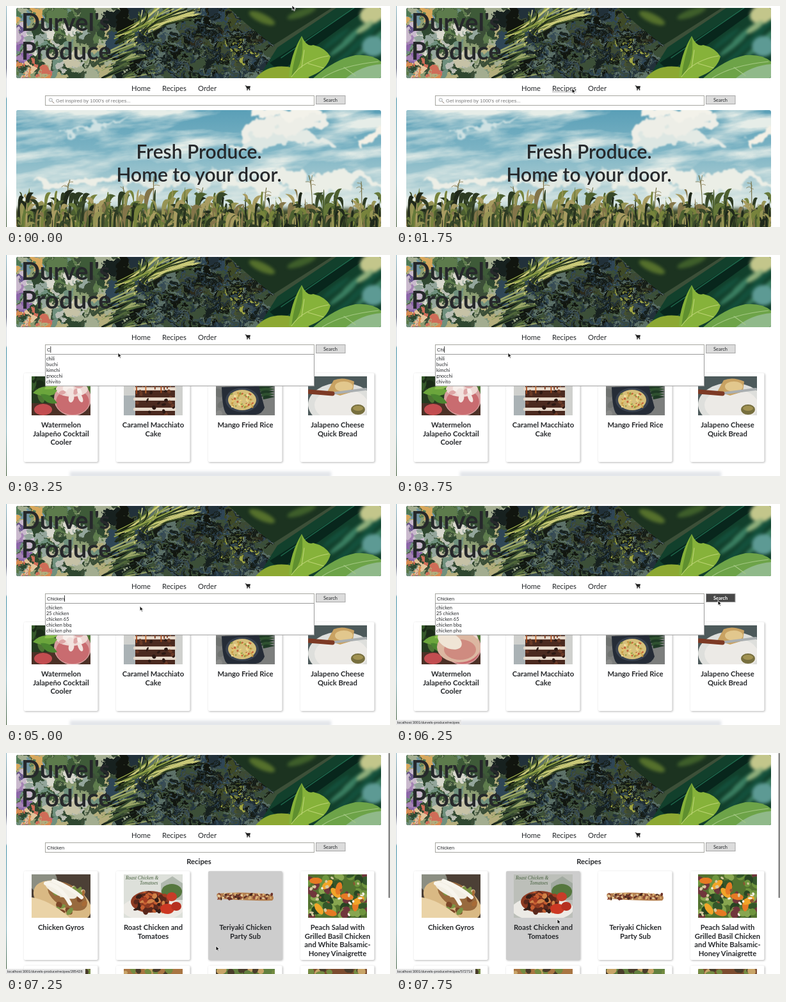
Recreate the animation shown at these times as an HTML page. Size 600x346 px, loop 8000 ms.

```html
<!DOCTYPE html>
<html lang="en">
<head>
<meta charset="utf-8">
<title>Durvel's Produce</title>
<style>
  html, body { margin: 0; width: 100%; height: 100%; overflow: hidden; background: #fff; }
  svg { display: block; }
  text { font-family: Lato, sans-serif; fill: #26282b; white-space: pre; }
  filter { color-interpolation-filters: sRGB; }
  .bold { font-weight: 700; }
  .mid { text-anchor: middle; }
  .ui { font-family: "Liberation Sans", Arial, sans-serif; }
  .card { filter: drop-shadow(1px 1px 1.5px #b5b5b5); }
</style>
</head>
<body>
<svg id="stage" width="600" height="346" viewBox="0 0 600 346"></svg>
<script>
const LOOP = 8000, STEP = 250;
let seed = 11;
const rnd = (a = 0, b = 1) => a + (b - a) * ((seed = seed * 16807 % 2147483647) / 2147483647);
const pick = list => list[Math.floor(rnd(0, list.length))];
const many = (n, make) => Array.from({ length: n }, (_, i) => make(i)).join('');

// Drawing helpers, each returning SVG markup
const rect = (x, y, w, h, fill, more = '') =>
  `<rect x="${x}" y="${y}" width="${w}" height="${h}" fill="${fill}" ${more}/>`;
const oval = (x, y, rx, ry, fill, turn = 0) =>
  `<ellipse rx="${rx}" ry="${ry}" fill="${fill}" transform="translate(${x} ${y}) rotate(${turn})"/>`;
const shape = (d, fill, more = '') => `<path d="${d}" fill="${fill}" ${more}/>`;
const stroke = (d, color, width = 1) =>
  `<path d="${d}" fill="none" stroke="${color}" stroke-width="${width}" stroke-linecap="round"/>`;
const text = (x, y, size, str, cls = '', more = '') =>
  `<text x="${x}" y="${y}" font-size="${size}" class="${cls}" ${more}>${str}</text>`;
const group = (id, body) => `<g id="${id}">${body}</g>`;
const blurred = (amount, body) => `<g style="filter:blur(${amount}px)">${body}</g>`;
const filtered = (id, body) => `<g filter="url(#${id})">${body}</g>`;
const frame = (x, y, w, h, body) => `<svg x="${x}" y="${y}" width="${w}" height="${h}">${body}</svg>`;
const rounded = (id, x, y, w, h, body) => `<clipPath id="${id}">${rect(x, y, w, h, '#000', 'rx="3"')}</clipPath>` +
  `<g clip-path="url(#${id})">${frame(x, y, w, h, body)}</g>`;
const gradient = (id, ...stops) => `<linearGradient id="${id}" x2="0" y2="1">` +
  stops.map(([at, color]) => `<stop offset="${at}" stop-color="${color}"/>`).join('') + '</linearGradient>';
const ragged = (id, frequency, scale, blur) => `<filter id="${id}" x="-10%" y="-10%" width="120%" height="120%">
  <feTurbulence type="fractalNoise" baseFrequency="${frequency}" numOctaves="4" seed="4" result="noise"/>
  <feDisplacementMap in="SourceGraphic" in2="noise" scale="${scale}" xChannelSelector="R" yChannelSelector="G"/>
  <feGaussianBlur stdDeviation="${blur}"/></filter>`;
const scatter = (n, x0, y0, x1, y1, size, colors) => many(n, () =>
  oval(rnd(x0, x1), rnd(y0, y1), rnd(size * .5, size), rnd(size * .3, size * .8), pick(colors), rnd(0, 180)));

function banner() {
  const kale = ['#17211f', '#22313a', '#3a4d54', '#5d7168', '#11150f', '#2f4656', '#3d4a34', '#151b14'];
  const curl = (x, y) => stroke(`M${x} ${y}q${rnd(-7, 7)} ${rnd(-7, 2)} ${rnd(3, 8)} ${rnd(-5, 4)}` +
    `t${rnd(-6, 8)} ${rnd(-4, 6)}`, pick(kale), rnd(1, 3));
  const scraps = filtered('crumple',
    scatter(120, -10, -10, 165, 120, 17, ['#5d7b4c', '#8b9c72', '#3e5a38', '#a3ad90', '#6f8f7d', '#2f4730', '#b3ad7c']) +
    scatter(30, 15, 30, 105, 95, 11, ['#d8d8cd', '#b9bdb4', '#c6c2a6', '#93a59b']) +
    scatter(16, -5, 30, 18, 85, 10, ['#8c66a8', '#a583b4', '#6c5a8e', '#c9b9cd']) +
    scatter(14, -5, 88, 55, 112, 8, ['#d98a4f', '#cf6d58', '#e3c39a', '#b56a83']) +
    scatter(14, -5, 0, 40, 20, 10, ['#6e94a3', '#4f7a55', '#d6a75c']));
  const darkLeaves = filtered('crumple',
    scatter(90, 150, -5, 400, 115, 18, kale) + scatter(30, 270, 0, 400, 60, 14, ['#10150f', '#2c2a1c', '#3f4a26']));
  const stems = many(54, () => stroke(
    `M${rnd(152, 205)} ${rnd(38, 58)}Q${rnd(195, 220)} ${rnd(18, 34)} ${rnd(190, 300)} ${rnd(-6, 16)}`,
    pick(['#b9bf63', '#8fa046', '#d3d491', '#4d6430', '#25331c', '#c8c878', '#1b2416']), rnd(1, 3.2)));
  const lowStems = many(30, () => stroke(
    `M${rnd(130, 175)} ${rnd(65, 112)}l${rnd(24, 60)} ${rnd(-30, -8)}`,
    pick(['#6e8347', '#33482f', '#9aa668', '#18231a', '#51683b']), rnd(1, 3)));
  const curls = filtered('crumple', many(420, () => curl(rnd(185, 400), rnd(36, 112))) +
    many(90, () => curl(rnd(265, 390), rnd(0, 42))) +
    scatter(32, 312, 55, 385, 85, 3.4, ['#a1a644', '#77803a', '#47512e']));
  const crate = shape('M378 110L408 62L500 0H570V110Z', '#12402c') +
    shape('M330 -2H496L402 58Q370 36 330 -2Z', '#1c3320') +
    shape('M396 86L528 0H550L412 100Z', '#08261c') + stroke('M414 78L528 0', '#1f6b4e', 1.5) +
    blurred(2.5, oval(560, 8, 24, 16, '#c3c68b', -20) + many(9, i =>
      oval(500 + i * 10, 48 - i * 3 + i % 3 * 14, 26, 4, i % 2 ? '#3b7f62' : '#14503c', -38)) +
      oval(558, 60, 18, 16, '#5d9a94') + oval(545, 30, 16, 5, '#8fae7b', -35) +
      oval(384, 16, 22, 7, '#55702c', 25) + oval(446, 8, 24, 6, '#3f5f2b', -20));
  const leaf = shape('M374 110Q392 88 424 92Q446 96 460 112Z', '#8ca832') +
    shape('M426 108Q428 74 446 44Q454 62 464 58Q482 62 491 76Q486 96 462 106Q446 114 426 108Z', '#86b23a') +
    shape('M446 44Q434 76 430 108Q452 84 446 44Z', '#5f8f2e') +
    shape('M464 110Q498 80 530 74Q556 72 570 84V110Z', '#6da348') + shape('M515 110Q540 90 570 88V110Z', '#90b98a') +
    stroke('M430 108Q448 82 488 75M446 93L450 66M456 87L480 94', '#bcd474', 1.1) +
    stroke('M478 110Q508 90 566 84M512 93L530 106', '#a5c985', 1.1);
  return rounded('bannerClip', 16, 3, 570, 110, rect(0, 0, 570, 110, '#3c4f38') + scraps +
    darkLeaves + lowStems + stems + curls + crate + leaf);
}

function field() {
  const sky = rect(0, 0, 570, 190, 'url(#sky)') +
    `<g transform="rotate(-6)">${rect(-40, -20, 640, 270, '#fff', 'filter="url(#wisps)"')}</g>`;
  const clouds = filtered('billow', oval(415, 26, 66, 16, '#edeee7', -12) + oval(425, 2, 52, 12, '#f3f2ea') +
    oval(375, 50, 45, 9, '#dde7e3', -8) + oval(455, 48, 40, 10, '#e3eae5', 12) +
    oval(555, 40, 34, 8, '#f3f0e6', -12) + oval(85, 110, 66, 9, '#eceee6') + oval(250, 112, 100, 9, '#e2e9e3') +
    oval(440, 112, 130, 14, '#ebeee6') + oval(120, 26, 50, 4, '#cfe2e3', -14));
  const greens = ['#4d6030', '#77833c', '#2d3a22', '#969455', '#20291b', '#a89c62', '#66793a', '#38482a', '#83754a'];
  const hedge = blurred(3, rect(-5, 154, 580, 45, '#434d2d'));
  const blade = top => {
    const x = rnd(-5, 575), lean = rnd(-18, 18), width = rnd(.9, 2.4), droop = rnd(-4, 9);
    return shape(`M${x - width} 190L${x - width * .6} ${top + 14}Q${x} ${top - 4} ${x + lean} ${top + droop}` +
      `Q${x + width} ${top + 6} ${x + width} 190Z`, pick(greens));
  };
  const stalks = [78, 170, 214, 287, 388, 463, 540].map(x => {
    const top = rnd(102, 122), tip = rnd(-9, 9);
    return stroke(`M${x} 175Q${x} ${top + 16} ${x + tip} ${top}`, '#6f6a3e', 1.1) +
      many(4, i => stroke(`M${x + tip * .4} ${top + 9 + i * 3}q${rnd(-3, 3)} -7 ${rnd(-10, 10)} ${rnd(-9, -1)}`, '#83774a', .8));
  }).join('');
  return rounded('fieldClip', 16, 163, 570, 183, sky + clouds + hedge + stalks +
    many(150, () => blade(rnd(124, 152))) + many(420, () => blade(rnd(142, 178))));
}

const script = 'font-style="italic" style="fill:#47613f;font-family:\'Liberation Serif\',serif"';
const photos = {
  cocktail: rect(0, 0, 92, 68, '#253b20') + scatter(22, 0, 0, 92, 35, 10, ['#35592a', '#1b2b18', '#4e7435']) +
    rect(0, 42, 92, 26, '#4c3127') + oval(64, 35, 29, 27, '#d8a0a0') + oval(64, 40, 26, 20, '#c96c70') +
    oval(63, 20, 25, 12, '#efd8d4') + scatter(10, 44, 14, 82, 34, 8, ['#f2e3df', '#dea6a6', '#f8f0ec']) +
    shape('M2 26Q18 8 40 22Q30 38 2 26Z', '#6ba53c') + shape('M20 20Q30 0 42 8Q44 22 20 20Z', '#8cc04f') +
    shape('M14 28Q30 26 40 42Q22 46 14 28Z', '#4b8530') + oval(18, 52, 14, 9, '#c24d50'),
  cake: rect(0, 0, 92, 68, '#cfd0cd') + rect(0, 30, 18, 38, '#aab2b5') + rect(18, 2, 62, 64, '#4b2a20', 'rx="5"') +
    many(4, i => rect(15, 1 + i * 16, 67, 5, i ? '#e6d9cb' : '#f0e5d9', 'rx="2.5"')) +
    many(13, i => stroke(`M${20 + i * 4.8} ${rnd(0, 8)}v${rnd(8, 22)}`, pick(['#a74b1f', '#c26a30', '#7a3419']), 1.8)) +
    scatter(20, 20, 23, 78, 60, 4, ['#2c1914', '#6a3a27']),
  rice: rect(0, 0, 92, 68, '#7c7e7d') + scatter(14, 0, 0, 60, 60, 9, ['#8a8b89', '#707371']) +
    many(9, i => shape(`M92 ${i * 4}Q70 ${i * 4 - 6} ${50 + i * 3} ${4 + i * 4}Q76 ${i * 4 + 4} 92 ${i * 4}Z`, i % 2 ? '#2f5130' : '#1f3a25')) +
    shape('M9 17L67 15L76 49Q72 59 62 60L18 60Q10 56 9 17Z', '#252c37') + oval(41, 37, 26, 19, '#39424f') +
    oval(41, 37, 22, 16, '#d6bf7a') +
    scatter(65, 24, 26, 58, 49, 2.2, ['#f1df9f', '#c89845', '#e9cd70', '#8d9b43', '#c3603a']),
  bread: rect(0, 0, 92, 68, '#4d5a5b') + oval(52, 44, 52, 34, '#dedfdc') + oval(52, 45, 42, 26, '#eceae6') +
    shape('M30 24L40 6Q54 0 72 8L70 24L50 30Z', '#c9a262') + oval(56, 16, 14, 8, '#e2c78d') +
    stroke('M36 27L90 20', '#a9aeb0', 4) + stroke('M1 24L38 27', '#7d3a25', 7) + oval(78, 52, 11, 8, '#776f3e') +
    oval(78, 50, 8, 4, '#a19252'),
  gyros: rect(0, 0, 92, 68, '#4c4036') + oval(18, 10, 22, 20, '#8b8e82') + oval(48, 42, 48, 28, '#d9b984', 25) +
    oval(56, 34, 34, 18, '#986a3e', 30) + scatter(22, 35, 20, 85, 58, 7, ['#a86b37', '#7b4728', '#7a9444', '#d9c59f']) +
    oval(46, 24, 27, 10, '#f2eee3', 24) + stroke('M22 14Q46 18 60 46M34 10Q60 20 78 36', '#f8f5ed', 6) +
    shape('M0 36Q28 40 60 68H0Z', '#ead3a7'),
  roast: rect(0, 0, 92, 68, '#9aa39155') + shape('M58 14L76 3L92 14V40H58Z', '#8b988b88') +
    oval(45, 54, 48, 19, '#eceae5') + oval(75, 27, 16, 12, '#55773e') + oval(41, 43, 30, 17, '#8d3a22') +
    scatter(55, 17, 30, 65, 58, 6, ['#a63d22', '#5a281c', '#c55e31', '#d18347', '#351e18']) +
    oval(75, 35, 8, 7, '#c73c28') + oval(68, 54, 11, 8, '#cc3823') + oval(82, 50, 8, 7, '#b62f20') +
    text(3, 8, 7.5, 'Roast Chicken &amp;', '', script) + text(25, 16, 7.5, 'Tomatoes', '', script),
  sub: shape('M2 30Q44 26 88 32Q92 37 88 41Q46 42 4 38Q0 34 2 30Z', '#b47f4e') +
    scatter(90, 4, 30, 88, 39, 2.8, ['#6c342a', '#e5cda0', '#8d4934', '#d8ae73', '#4b281e']),
  salad: rect(0, 0, 92, 68, '#52722f') +
    scatter(90, 0, 0, 92, 68, 9, ['#6e943d', '#34572a', '#88a650', '#70363c', '#284422']) +
    many(9, i => oval(12 + (i * 31) % 75, 10 + (i * 19) % 51, 10, 5, i % 2 ? '#f1a529' : '#e67a24', i * 47)) +
    scatter(30, 3, 3, 90, 65, 3.4, ['#f3eee0', '#d7c99f', '#8c5533'])
};

const cardX = i => 28 + i * 144;
function card(i, photo, photoHeight, lines) {
  const x = cardX(i);
  return rect(x, 185, 115.5, 139, '#fff', 'class="card" rx="2"') +
    frame(x + 12, 190, 92, photoHeight, photos[photo]) +
    lines.map((line, n) => text(x + 58, 209 + photoHeight + n * 13.6, 11.25, line, 'bold mid')).join('');
}
const recipesTitle = text(301.5, 174, 11.25, 'Recipes', 'bold mid');

const home = field() + text(301.5, 239, 30, 'Fresh Produce.', 'mid', 'font-weight="600"') +
  text(301.5, 274.5, 30, 'Home to your door.', 'mid', 'font-weight="600"');

const recipes = recipesTitle +
  card(0, 'cocktail', 61, ['Watermelon', 'Jalapeño Cocktail', 'Cooler']) +
  card(1, 'cake', 61, ['Caramel Macchiato', 'Cake']) +
  card(2, 'rice', 61, ['Mango Fried Rice']) +
  card(3, 'bread', 61, ['Jalapeno Cheese', 'Quick Bread']) +
  group('ham', frame(40, 190, 92, 61, oval(58, 34, 34, 24, '#dcb7a1') + oval(60, 38, 25, 16, '#cf8b80') +
    oval(44, 24, 20, 12, '#f0e5d6', 25))) +
  blurred(2, rect(100, 339, 408, 10, '#e3e6ea'));

const results = recipesTitle +
  card(0, 'gyros', 68, ['Chicken Gyros']) +
  card(1, 'roast', 68, ['Roast Chicken and', 'Tomatoes']) +
  card(2, 'sub', 68, ['Teriyaki Chicken', 'Party Sub']) +
  card(3, 'salad', 68, ['Peach Salad with', 'Grilled Basil Chicken', 'and White Balsamic-', 'Honey Vinaigrette']) +
  ['#6d5a39', '#a97643', '#62803f', '#7c4c2f'].map((color, i) =>
    rect(cardX(i), 333, 115.5, 20, '#fff', 'class="card" rx="2"') +
    frame(cardX(i) + 12, 338, 92, 8, rect(0, 0, 92, 8, color) +
      scatter(16, 0, 0, 92, 8, 8, [color, '#493c2b', '#748c42', '#c8a468']))).join('');

const searchBar = rect(61.5, 140.5, 420, 15, '#fff', 'stroke="#a6a6a0"') +
  group('placeholder', stroke('M72 149.2L75 152', '#8a7a70', 1) +
    '<circle cx="69.8" cy="147" r="2.6" fill="#eef3f4" stroke="#999" stroke-width=".7"/>' +
    text(78, 151, 7.6, "Get inspired by 1000's of recipes...", 'ui', 'style="fill:#7a7a7a"')) +
  text(64, 151, 7.5, '', 'ui', 'id="query"') + rect(64, 143, .8, 10, '#111', 'id="caret"') +
  rect(484.5, 140.5, 45.5, 13, '#dcdcdc', 'id="button" stroke="#a6a6a6"') +
  text(507, 150, 7.4, 'Search', 'mid', 'id="buttonLabel"');

const nav = text(196, 132.7, 11.25, 'Home') + text(244, 132.7, 11.25, 'Recipes') + text(300, 132.7, 11.25, 'Order') +
  group('underline', rect(244, 134, 38, .6, '#777')) +
  stroke('M374 125h1.4l1.3 4.6h4.2', '#111', 1) + shape('M375.4 125.4h6.6l-1 3.3h-4.7Z', '#111') +
  oval(377, 131.2, .9, .9, '#111') + oval(380.5, 131.2, .9, .9, '#111');

const stage = document.getElementById('stage');
stage.innerHTML = '<defs>' +
  gradient('sky', [0, '#5a9fb7'], [.35, '#7fb5c5'], [.7, '#b5d2d6'], [1, '#dbe5dc']) +
  gradient('edge', [0, '#8ab6c4'], [.17, '#47636f'], [.28, '#39415f'], [.33, '#d8dcdf'], [.41, '#d8dcdf'],
    [.42, '#3f8ca4'], [.8, '#78aab4'], [1, '#3c5632']) +
  ragged('crumple', .07, 22, .3) + ragged('billow', .025, 60, 1.2) +
  `<filter id="wisps" x="0" y="0" width="1" height="1">
    <feTurbulence type="fractalNoise" baseFrequency=".007 .03" numOctaves="5" seed="8"/>
    <feColorMatrix values="0 0 0 0 .9  0 0 0 0 .93  0 0 0 0 .91  3.4 0 0 0 -1.45"/></filter></defs>` +
  rect(0, 0, 600, 346, '#fff') + rect(0, 0, 1, 346, 'url(#edge)') + banner() +
  text(24, 39, 38.2, "Durvel's", 'bold') + text(24, 84, 38.2, 'Produce', 'bold') + nav +
  group('home', home) + group('recipes', recipes) + group('results', results) + searchBar +
  group('menu', rect(61.5, 155.5, 420, 49.5, '#fff', 'stroke="#999"') +
    many(5, i => text(63, 164.6 + i * 9.2, 7.5, '', 'suggestion'))) +
  rect(597.5, 0, 2.5, 322, '#858585', 'id="scrollbar" rx="1.2"') +
  group('status', rect(0, 338, 100, 8, '#e4e4e4', 'id="statusBox"') + text(2, 344, 5.6, '', 'ui', 'id="link"')) +
  group('cursor', shape('M0 0V7.6L1.8 6L3.1 8.8L4.4 8.2L3.2 5.6H5.6Z', '#111', 'stroke="#fff" stroke-width=".8"'));

const el = id => document.getElementById(id);
const show = (id, on) => { el(id).style.display = on ? '' : 'none'; };
const suggestions = [...document.querySelectorAll('.suggestion')];
const resultCards = [...el('results').querySelectorAll('.card')].slice(0, 4);

// time, x, y, sag of the path leading there
const path = [[0, 447, -1, 0], [1750, 275, 129, 0], [2000, 275, 129, 0], [2500, 175, 153, 0], [4750, 175, 153, 0],
  [6000, 503, 151, 12], [6250, 503, 151, 0], [7250, 328, 302, 0], [7500, 272, 273, 0], [7750, 252, 260, 0]];
const caretFlips = [2500, 2750, 3250, 4500, 5000, 5500, 6000, 6250];
const typing = [[3250, 'C'], [3500, 'Ch'], [3750, 'Chi'], [4000, 'Chick'], [4250, 'Chicken']];
const early = ['chili', 'buchi', 'kimchi', 'gnocchi', 'chivito'];
const late = ['chicken', '25 chicken', 'chicken 65', 'chicken bbq', 'chicken pho'];
const recipeIds = { 1: '572718', 2: '285428' };

function cursorAt(t) {
  const next = path.findIndex(key => key[0] > t);
  if (next < 0) return path.at(-1).slice(1, 3);
  const [t0, x0, y0] = path[next - 1], [t1, x1, y1, sag] = path[next];
  const p = (t - t0) / (t1 - t0), e = p * p * (3 - 2 * p);
  return [x0 + (x1 - x0) * e, y0 + (y1 - y0) * e + sag * Math.sin(Math.PI * p)];
}

function render(t) {
  const page = t < 2000 ? 'home' : t < 6500 ? 'recipes' : 'results';
  ['home', 'recipes', 'results'].forEach(id => show(id, id === page));
  const [x, y] = cursorAt(t);
  el('cursor').setAttribute('transform', `translate(${x} ${y})`);
  show('underline', x > 243 && x < 283 && y > 122 && y < 137);

  const query = typing.filter(([at]) => t >= at).at(-1)?.[1] ?? '';
  el('query').textContent = query;
  show('placeholder', !query);
  show('caret', caretFlips.filter(at => t >= at).length % 2);
  el('caret').setAttribute('x', 64 + (query ? el('query').getComputedTextLength() : 0));
  show('menu', query && page === 'recipes');
  suggestions.forEach((line, i) => { line.textContent = (query.length > 3 ? late : early)[i]; });
  show('ham', t >= 6250);

  const onButton = x > 484 && x < 531 && y > 140 && y < 155;
  el('button').setAttribute('fill', onButton ? '#484848' : '#dcdcdc');
  el('buttonLabel').style.cssText = onButton ? 'fill:#fff;font-weight:700' : '';

  const hovered = page === 'results' && y > 185 && y < 324
    ? resultCards.findIndex((_, i) => x > cardX(i) && x < cardX(i) + 116) : -1;
  resultCards.forEach((box, i) => box.setAttribute('fill', i === hovered ? '#cdcdcd' : '#fff'));
  const id = recipeIds[hovered];
  el('link').textContent = 'localhost:3001/durvels-produce/recipes' + (id ? '/' + id : '');
  show('status', id || (t >= 6250 && t < 6750));
  el('statusBox').setAttribute('width', id ? 124 : 102);

  show('scrollbar', page === 'results' || (page === 'recipes' && t < 3250));
  el('scrollbar').setAttribute('height', page === 'results' ? 227 : 322);
}

let last = -1;
function tick(now) {
  const t = Math.floor(now % LOOP / STEP) * STEP;
  if (t !== last) render(last = t);
  requestAnimationFrame(tick);
}
render(0);
requestAnimationFrame(tick);
</script>
</body>
</html>
```
